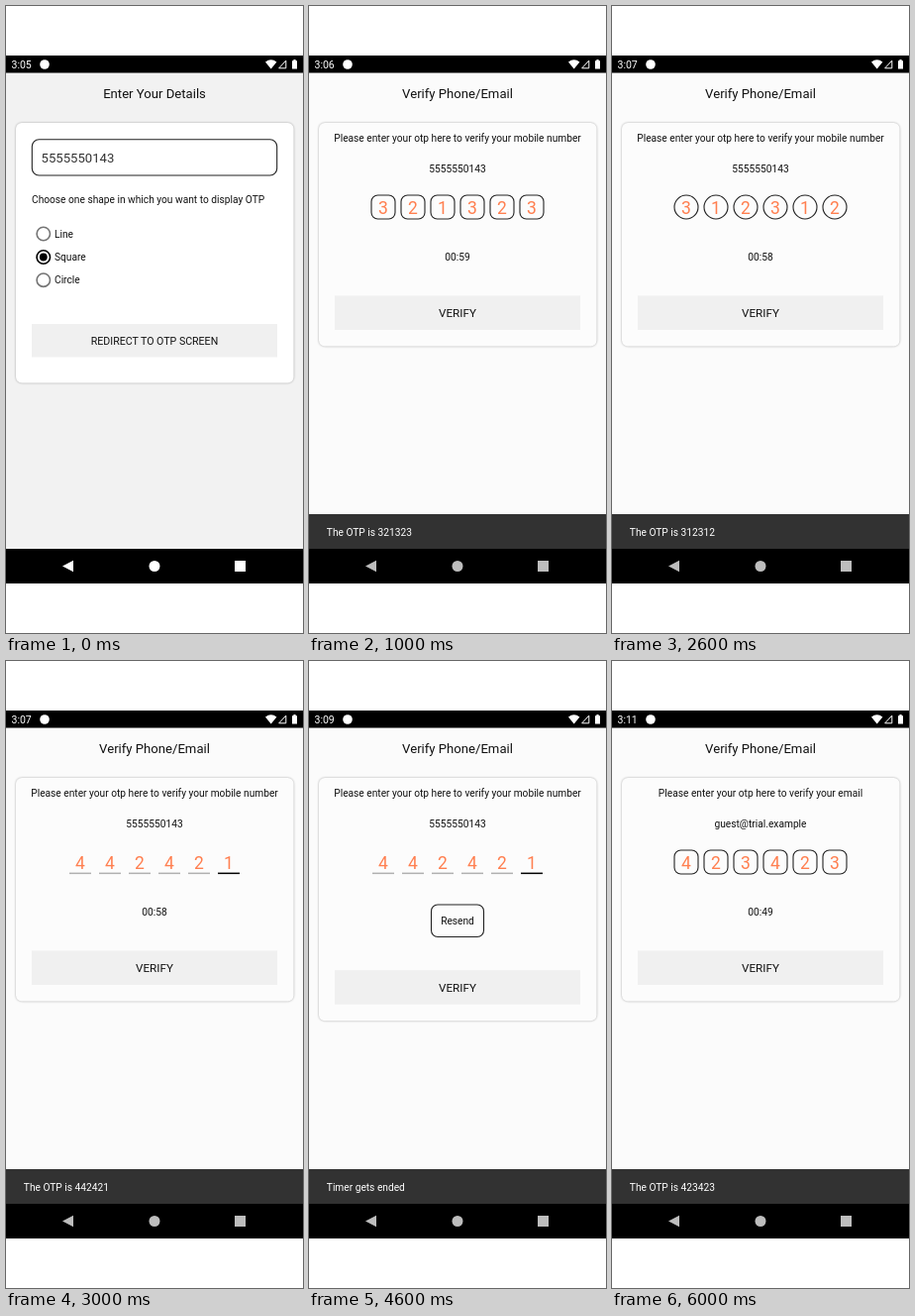
Recreate the animation shown at these times as an HTML page. Size 300 px wide and 633 px high, loop 7000 ms.

```html
<!DOCTYPE html>
<html lang="en">
<meta charset="utf-8">
<title>OTP flow</title>
<style>
  html, body { margin: 0; height: 100%; overflow: hidden; background: #fff; }
  svg { display: block; font-family: Roboto, sans-serif; }
  .card { filter: drop-shadow(0 .8px 1.3px #0005); }
</style>
<svg id="stage" width="300" height="633" viewBox="0 0 300 633"></svg>
<script>
const PHONE = '5555550143', EMAIL = 'guest@trial.example';
const SMALL = 10.2, LARGE = 13.13;
const INK = '#111', GREY = '#bdbdbd';

const screens = [
  { clock: '3:05', input: PHONE, nav: '#fff' },
  { clock: '3:06', to: PHONE, otp: '321323', shape: 'square', timer: '00:59' },
  { clock: '3:07', to: PHONE, otp: '312312', shape: 'circle', timer: '00:58' },
  { clock: '3:07', to: PHONE, otp: '442421', shape: 'line', timer: '00:58' },
  { clock: '3:09', to: PHONE, otp: '442421', shape: 'line', toast: 'Timer gets ended' },
  { clock: '3:10', input: EMAIL, cursor: true },
  { clock: '3:11', to: EMAIL, otp: '423423', shape: 'square', timer: '00:49' },
];

const rect = (x, y, w, h, fill, extra = '') =>
  `<rect x="${x}" y="${y}" width="${w}" height="${h}" fill="${fill}" ${extra}/>`;
const box = (x, y, w, h, r) =>
  rect(x, y, w, h, 'none', `rx="${r}" stroke="#222" stroke-width="1.1"`);
const circle = (x, y, r, fill, extra = '') =>
  `<circle cx="${x}" cy="${y}" r="${r}" fill="${fill}" ${extra}/>`;
const path = (d, fill, extra = '') => `<path d="${d}" fill="${fill}" ${extra}/>`;
const text = (s, x, y, size = SMALL, fill = INK, anchor = 'start') =>
  `<text x="${x}" y="${y}" font-size="${size}" fill="${fill}" text-anchor="${anchor}">${s}</text>`;
const centered = (s, y, size, fill, x = 150) => text(s, x, y, size, fill, 'middle');
const card = (height, fill) => rect(10, 118, 280.5, height, fill, 'rx="6" class="card"');

function phoneFrame({ clock, nav = GREY }) {
  return rect(0, 50, 300, 17.5, '#000') + text(clock, 5.5, 63, 10.5, '#fff') +
    circle(39, 59, 4.8, '#fff') +
    path('M262 56.6Q267.7 51.8 273.4 56.6L267.7 63.4Z', '#fff') +
    path('M275.7 62.8H282.8V55.2Z', 'none', 'stroke="#fff"') +
    path('M289 55.2H290.4V54H292.6V55.2H294V63.4H289Z', '#fff') +
    rect(0, 548, 300, 35, '#000') +
    path('M57 565.5L68 559.8V571.2Z', nav) + circle(150, 565.5, 5.5, nav) +
    rect(231, 560, 11, 11, nav);
}

function radio(label, y, on) {
  const color = on ? '#000' : '#757575';
  return circle(37.8, y, 6.7, 'none', `stroke="${color}" stroke-width="1.6"`) +
    (on ? circle(37.8, y, 3.9, color) : '') + text(label, 49, y + 3.7);
}

function detailsScreen({ input, cursor }) {
  return rect(0, 67, 300, 481, '#f2f2f2') + centered('Enter Your Details', 93, LARGE) +
    card(262.5, '#fff') + box(26.3, 134.8, 247.4, 36.2, 7) +
    text(input, 35.6, 157.8, LARGE, '#333') +
    (cursor ? rect(156, 144, 1.5, 17.5, '#000') : '') +
    text('Choose one shape in which you want to display OTP', 26, 199) +
    radio('Line', 230) + radio('Square', 253.5, true) + radio('Circle', 276.7) +
    rect(26, 321, 248, 33.5, '#f0f0f0') + centered('REDIRECT TO OTP SCREEN', 342, 10.6);
}

function digit(char, i, shape) {
  const x = 75 + i * 30;
  const outline = {
    square: () => box(x - 12, 191, 24, 24, 6.5),
    circle: () => box(x - 12, 191, 24, 24, 12),
    line: () => rect(x - 11, 213.6, 22, 1.5, i === 5 ? '#000' : '#b0b0b0'),
  }[shape]();
  return outline + centered(char, 209.6, 17.5, '#ff7f50', x);
}

function verifyScreen({ to, otp, shape, timer, toast = 'The OTP is ' + otp }) {
  const shift = timer ? 0 : 19.7;
  const kind = to === EMAIL ? 'email' : 'mobile number';
  return rect(0, 67, 300, 481, '#fbfbfb') + centered('Verify Phone/Email', 93, LARGE) +
    card(225.5 + shift, '#fcfcfc') +
    centered(`Please enter your otp here to verify your ${kind}`, 137.3) +
    centered(to, 168) + [...otp].map((c, i) => digit(c, i, shape)).join('') +
    (timer ? centered(timer, 256.7) : box(123.5, 246, 53, 32.5, 6.5) + centered('Resend', 266)) +
    rect(26, 292.5 + shift, 248, 34.5, '#f0f0f0') + centered('VERIFY', 314.2 + shift, 11.67) +
    rect(0, 513, 300, 35, '#323232') + text(toast, 17.8, 534.7, SMALL, '#fff');
}

const stage = document.getElementById('stage');
let shown = -1;
function draw() {
  const index = Math.floor(performance.now() / 1000) % screens.length;
  if (index !== shown) {
    const screen = screens[shown = index];
    stage.innerHTML = (screen.input ? detailsScreen : verifyScreen)(screen) + phoneFrame(screen);
  }
  requestAnimationFrame(draw);
}
draw();
</script>
</html>
```
